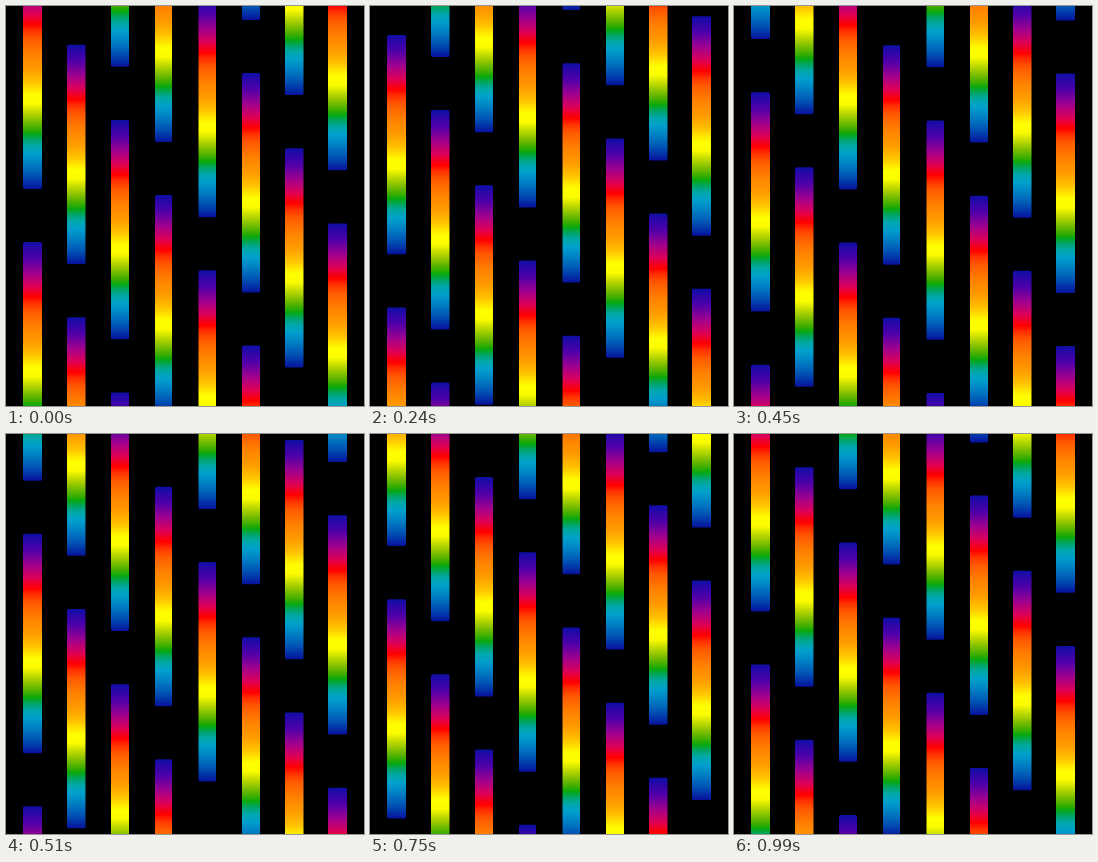
Animation of 358 by 400 pixels, one loop 1.02 s. Source, as an HTML page with a canvas:

```html
<!DOCTYPE html>
<html lang="en">
<head>
<meta charset="utf-8">
<title>Rainbow bars</title>
<style>
html, body { margin: 0; width: 100%; height: 100%; overflow: hidden; background: #000; }
canvas { display: block; }
</style>
</head>
<body>
<canvas id="stage" width="358" height="400"></canvas>
<script>
const ctx = document.getElementById('stage').getContext('2d');
const HEIGHT = 400, PERIOD = 272.5, BAR = 219.4;
const START = 236, SHIFT = 75.2;      // first bar top, offset per column
const STEP = 30, LOOP = 1020, HALF = 17;

// left and right edge of each column
const columns = [
  [17, 36], [61, 79.5], [105, 123], [149, 166],
  [192.5, 210], [236, 254], [279, 297.5], [322, 341]
];

// distance from the bar top, colour
const stops = [
  [0, '#0c10a4'], [5, '#2408a8'], [17, '#5200a8'], [31, '#a0008e'],
  [44, '#dc0058'], [51, '#f4001c'], [55, '#ff0000'], [61, '#ff3000'],
  [69, '#ff5800'], [84, '#ff8000'], [100, '#ff9c00'], [113, '#ffc400'],
  [122, '#fff000'], [126, '#ffff00'], [134, '#fcfc00'], [142, '#c4dc00'],
  [152, '#78bc00'], [160, '#34ac00'], [164, '#08a810'], [170, '#00a468'],
  [176, '#00a8a8'], [184, '#00a0cc'], [194, '#0080c4'], [206, '#0054b4'],
  [215, '#0428a4'], [BAR, '#08109c']
];

const fill = ctx.createLinearGradient(0, 0, 0, BAR);
stops.forEach(([y, colour]) => fill.addColorStop(y / BAR, colour));

// 100 units per cycle: three per step, two at the end of each half
function travel(ms) {
  const n = Math.floor((ms % LOOP) / STEP);
  const units = Math.floor(n / HALF) * 50 + (n % HALF) * 3;
  return units / 100 * PERIOD;
}

function drawBar(left, right, top) {
  ctx.save();
  ctx.translate(0, top);
  ctx.beginPath();
  ctx.roundRect(left, 0, right - left, BAR, 1.5);
  ctx.fillStyle = fill;
  ctx.fill();
  ctx.restore();
}

function draw(ms) {
  ctx.fillStyle = '#000';
  ctx.fillRect(0, 0, 358, HEIGHT);
  const moved = travel(ms);
  columns.forEach(([left, right], i) => {
    const first = (START + i * SHIFT + moved) % PERIOD - PERIOD;
    for (let y = first; y < HEIGHT; y += PERIOD) drawBar(left, right, y);
  });
}

const begin = performance.now();
function tick() {
  draw(performance.now() - begin);
  requestAnimationFrame(tick);
}
tick();
</script>
</body>
</html>
```
